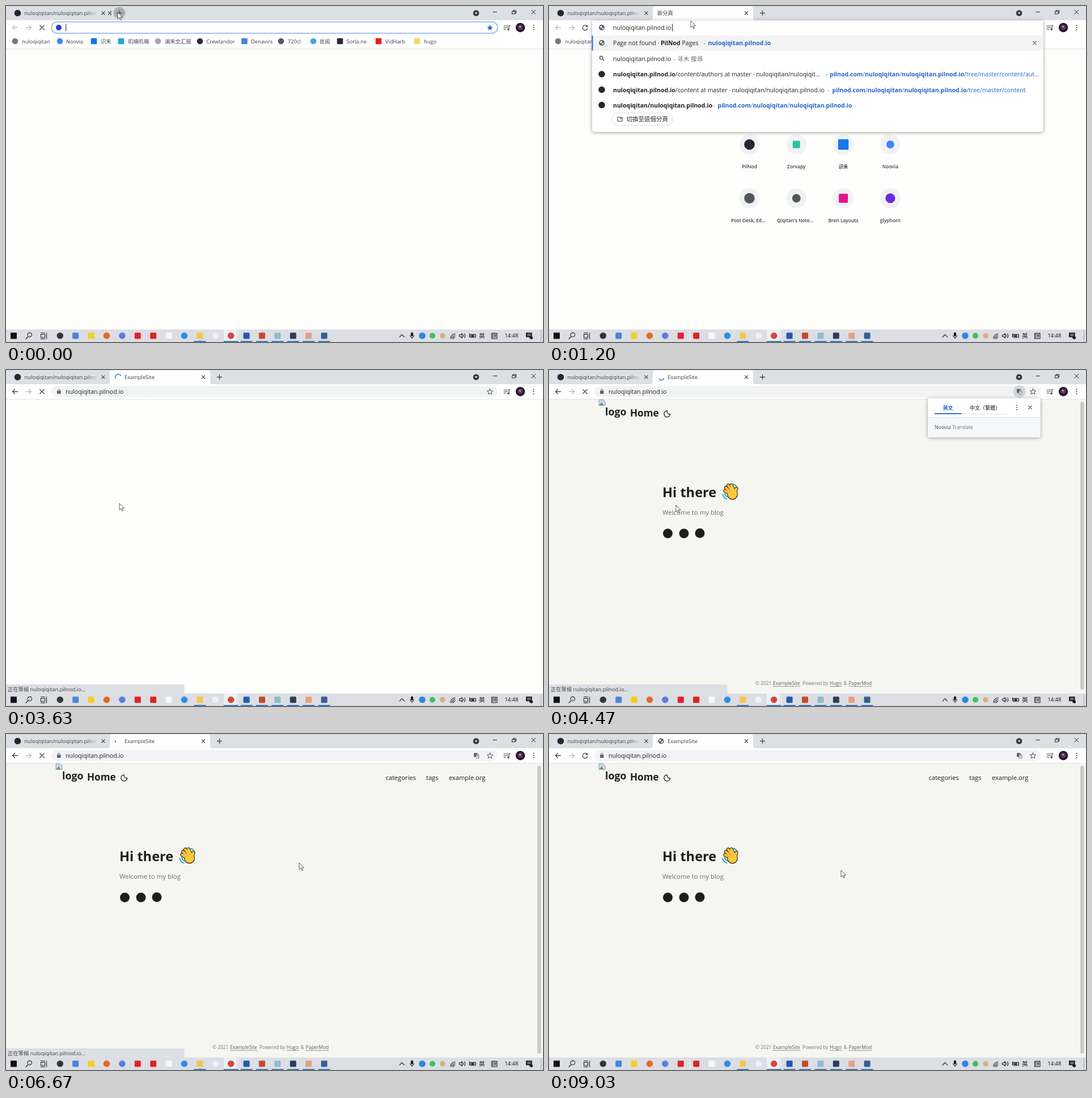
Write an HTML page that moves like this. It is 947 by 592 pixels and loops after 9.56 s.

```html
<!DOCTYPE html>
<html lang="zh-Hant">
<head>
<meta charset="utf-8">
<title>Browser session</title>
<style>
html, body { margin: 0; width: 100%; height: 100%; overflow: hidden; background: #fefefc; }
svg { display: block; width: 100%; height: 100%; }
text { font: 9.3px "Open Sans", "Noto Sans CJK TC", "Noto Sans CJK SC", "Noto Sans CJK", sans-serif; fill: #3c4043; white-space: pre; }
.url text { font-size: 10.6px; fill: #202124; }
.url .link { fill: #2a62c8; }
.url .dim { fill: #6b7075; }
.b { font-weight: 700; font-size: 10.5px; }
.line { fill: none; stroke: #45494d; stroke-width: 1.3; stroke-linecap: round; stroke-linejoin: round; }
.faint { stroke: #b9bcc0; }
.tile { font-size: 8.4px; font-weight: 600; text-anchor: middle; }
.nav text { font-size: 11.1px; fill: #1e1e1e; }
.foot text { font-size: 8.4px; fill: #77777a; }
.foot .a { fill: #5c5c60; }
.float { filter: drop-shadow(0 1.5px 3px rgba(0,0,0,.38)); }

/* One loop is 9560 ms; 1% is 95.6 ms. */
.t { animation: 9560ms step-end infinite; }
.opening { animation-name: opening; }
.opened { animation-name: opened; }
.ntp { animation-name: ntp; }
.stop { animation-name: stop; }
.reload { animation-name: reload; }
.focus { animation-name: focus; }
.drop { animation-name: drop; }
.connect { animation-name: connect; }
.newtitle { animation-name: newtitle; }
.before { animation-name: before; }
.after { animation-name: after; }
.address { animation-name: address; }
.site { animation-name: site; }
.bar { animation-name: bar; }
.popup { animation-name: popup; }
.loading { animation-name: loading; }
.done { animation-name: done; }
.status { animation-name: status; animation-timing-function: linear; }
@keyframes opening { 0% { opacity: 1 } .31%, 100% { opacity: 0 } }
@keyframes opened { 0% { opacity: 0 } .31%, 100% { opacity: 1 } }
@keyframes ntp { 0% { opacity: 0 } 1.57% { opacity: 1 } 32.43%, 100% { opacity: 0 } }
@keyframes stop { 0% { opacity: 1 } 2.09% { opacity: 0 } 14.64% { opacity: 1 } 73.38%, 100% { opacity: 0 } }
@keyframes reload { 0% { opacity: 0 } 2.09% { opacity: 1 } 14.64% { opacity: 0 } 73.38%, 100% { opacity: 1 } }
@keyframes focus { 0% { opacity: 1 } 5.02%, 100% { opacity: 0 } }
@keyframes drop { 0% { opacity: 0 } 5.02% { opacity: 1 } 14.64%, 100% { opacity: 0 } }
@keyframes connect { 0% { opacity: 0 } 14.64% { opacity: 1 } 32.43%, 100% { opacity: 0 } }
@keyframes newtitle { 0% { opacity: 0 } .9% { opacity: 1 } 14.64%, 100% { opacity: 0 } }
@keyframes before { 0% { opacity: 1 } 32.43%, 100% { opacity: 0 } }
@keyframes after { 0% { opacity: 0 } 32.43%, 100% { opacity: 1 } }
@keyframes address { 0% { opacity: 0 } 14.64%, 100% { opacity: 1 } }
@keyframes site { 0% { opacity: 0 } 40.27%, 100% { opacity: 1 } }
@keyframes bar { 0% { opacity: 0 } 41.84%, 100% { opacity: 1 } }
@keyframes popup { 0% { opacity: 0 } 46.03% { opacity: 1 } 64.85%, 100% { opacity: 0 } }
@keyframes loading { 0% { opacity: 0 } 32.43% { opacity: 1 } 73.38%, 100% { opacity: 0 } }
@keyframes done { 0% { opacity: 0 } 73.38%, 100% { opacity: 1 } }
@keyframes status { 0%, 15.6% { opacity: 0 } 15.9%, 75% { opacity: 1 } 76.05%, 100% { opacity: 0 } }

.grow { transform-origin: 183px 0; animation: grow 9560ms infinite; }
.close2 { animation: close2 9560ms infinite; }
.plus { animation: plus 9560ms infinite; }
@keyframes grow { 0%, .31% { transform: scaleX(.02) } 2.1%, 100% { transform: none } }
@keyframes close2 { 0%, .31% { transform: translateX(-165px) } 2.1%, 100% { transform: none } }
@keyframes plus { 0%, .31% { transform: translateX(-176.5px) } 2.1%, 100% { transform: none } }

.spin { fill: none; stroke-width: 1.5; transform-origin: 198px 12.5px; }
.wait { stroke: #8b9096; stroke-dasharray: 110 360; animation: wait 1593.33ms linear infinite; }
.load { stroke: #2f6fd6; animation: load 9560ms linear infinite; }
@keyframes wait { from { transform: rotate(40deg) } to { transform: rotate(-320deg) } }
@keyframes load {
  0%, 32.43% { transform: rotate(10deg); stroke-dasharray: 20 360 }
  37.97% { transform: rotate(145deg); stroke-dasharray: 190 360 }
  44.98% { transform: rotate(340deg); stroke-dasharray: 20 360 }
  49.16% { transform: rotate(430deg); stroke-dasharray: 270 360 }
  54.39% { transform: rotate(460deg); stroke-dasharray: 170 360 }
  58.58% { transform: rotate(670deg); stroke-dasharray: 20 360 }
  63.81% { transform: rotate(740deg); stroke-dasharray: 270 360 }
  69.77% { transform: rotate(870deg); stroke-dasharray: 45 360 }
  73.38%, 100% { transform: rotate(940deg); stroke-dasharray: 150 360 }
}

.mouse { animation: mouse 9560ms ease-in-out infinite; }
@keyframes mouse {
  0%, .31% { transform: translate(197px, 11px) }
  5%, 14.64% { transform: translate(250px, 26px) }
  20%, 23.7% { transform: translate(202px, 240px) }
  37.5%, 44% { transform: translate(200px, 235px) }
  51%, 57% { transform: translate(273px, 244px) }
  66%, 70.8% { transform: translate(517px, 227px) }
  72.5%, 100% { transform: translate(515px, 240px) }
}
.arrow { animation-name: arrow; }
.beam { animation-name: beam; }
@keyframes arrow { 0% { opacity: 1 } 48% { opacity: 0 } 59%, 100% { opacity: 1 } }
@keyframes beam { 0% { opacity: 0 } 48% { opacity: 1 } 59%, 100% { opacity: 0 } }
</style>
</head>
<body>
<svg viewBox="0 0 947 592" preserveAspectRatio="none">
<defs>
  <linearGradient id="fade"><stop offset="0" stop-color="#dcdfe4" stop-opacity="0"/><stop offset="1" stop-color="#dcdfe4"/></linearGradient>
  <g id="globe"><circle r="5" fill="#5f6368"/><path d="M-3.4-2 0-3.2 .8-1-1 .4-2.8 0ZM1 .6 3.6 0 2.6 2.6 .4 3.6Z" fill="#fff"/></g>
  <path id="x" d="M-2.6-2.6 2.6 2.6M2.6-2.6-2.6 2.6"/>
  <path id="star" d="M0-5.2 1.5-1.8 5.1-1.5 2.4 .9 3.2 4.4 0 2.6-3.2 4.4-2.4 .9-5.1-1.5-1.5-1.8Z"/>
  <path id="fingers" d="M321 218 310.5 213M322 216 312 207.5M324 214 316 203.5M327 214 321.5 203M327 219 330.5 209"/>
</defs>

<rect width="947" height="592" fill="#fefefc"/>

<!-- start page -->
<g class="t ntp" id="tiles"></g>

<!-- site -->
<g class="t site">
  <rect y="52" width="947" height="519" fill="#f5f5f2"/>
  <path d="M88 52.5h7.5l3.5 3.5v6.5h-11Z" fill="#c6d9f2" stroke="#8b9096" stroke-width=".8"/>
  <path d="M88.5 62 93 57l3 5Z" fill="#52a552"/>
  <text class="b" x="99" y="80" style="font-size:17.8px;fill:#1e1e1e">logo</text>
  <text class="b" x="143" y="81.5" style="font-size:17.1px;fill:#1e1e1e">Home</text>
  <path class="line" d="M208.5 71.8A4.3 4.3 0 0 0 213.8 77.6 5.5 5.5 0 1 1 208.5 71.8Z" style="stroke:#1e1e1e"/>
  <g class="nav"><text x="669.5" y="80.5">categories</text><text x="741" y="80.5">tags</text><text x="781" y="80.5">example.org</text></g>
  <text class="b" x="200" y="223.5" style="font-size:23.6px;fill:#1e1e1e">Hi there</text>
  <g stroke-linecap="round" fill="none">
    <path d="M306.5 219q1 6 7 8.5M310 217.5q.5 4 4 6M325 201.5q5 1 7 6" stroke="#2aa6b8" stroke-width="1.8"/>
    <use href="#fingers" stroke="#33291a" stroke-width="6.4"/>
    <circle cx="323.5" cy="219" r="9.5" fill="#33291a"/>
    <circle cx="323.5" cy="219" r="8.3" fill="#ffc83d"/>
    <use href="#fingers" stroke="#ffc83d" stroke-width="4.2"/>
    <path d="M313 213.5 318.5 217M315.5 208.5 321 214" stroke="#c98a1e" stroke-width=".8"/>
  </g>
  <text x="200" y="254.5" style="font-size:11.4px;fill:#6c6c6c">Welcome to my blog</text>
  <g fill="#1e1e1e"><circle cx="209.5" cy="288" r="8.5"/><circle cx="238" cy="288" r="8.5"/><circle cx="266" cy="287.5" r="8.5"/></g>
  <g class="foot">
    <text x="364" y="555">© 2021</text><text class="a" x="395" y="555">ExampleSite</text>
    <text x="447" y="555">Powered by</text><text class="a" x="495" y="555">Hugo</text>
    <text x="519.5" y="555">&amp;</text><text class="a" x="528.5" y="555">PaperMod</text>
    <path d="M395 557.5h48M495 557.5h22M528.5 557.5h41" stroke="#77777a" stroke-width=".8"/>
  </g>
</g>
<rect class="t bar" x="937" y="56" width="6.5" height="507" rx="3" fill="#c8c9c9"/>

<!-- status bubble -->
<g class="t status">
  <path d="M0 554h311q3.5 0 3.5 3.5V571H0Z" fill="#dcdfe4"/>
  <text class="t before" x="3" y="565.5">正在建立安全連線...</text>
  <text class="t after" x="3" y="565.5">正在等候 nuloqiqitan.pilnod.io...</text>
</g>

<!-- tab strip -->
<rect width="947" height="25" fill="#dcdfe4"/>
<circle cx="20.5" cy="12.5" r="5.8" fill="#24292f"/>
<text x="32.5" y="16">nuloqiqitan/nuloqiqitan.pilno</text>
<rect x="143" y="2" width="19" height="21" fill="url(#fade)"/>
<rect x="161" y="2" width="6" height="21" fill="#dcdfe4"/>
<use href="#x" class="line" x="171.5" y="12.5"/>
<path class="t opening" d="M184.5 7v11" stroke="#9aa0a6" stroke-width=".8"/>
<g class="t opened">
  <path class="grow" d="M178 25.5Q183 25 183 20V5Q183 .5 187.5 .5H355.5Q360 .5 360 5V20Q360 25 365 25.5Z" fill="#fefefe"/>
</g>
<text class="t newtitle" x="191" y="16">新分頁</text>
<g class="t connect"><circle class="spin wait" cx="198" cy="12.5" r="5" pathLength="360"/><text x="209" y="16">新分頁</text></g>
<text class="t after" x="209" y="16">ExampleSite</text>
<g class="t loading"><circle class="spin load" cx="198" cy="12.5" r="5.2" pathLength="360"/></g>
<g class="t done"><use href="#globe" x="197.5" y="12.5"/></g>
<g class="close2"><use href="#x" class="line" x="348" y="12.5"/></g>
<g class="plus">
  <circle class="t opening" cx="376.5" cy="12" r="10.3" fill="#a9acb1"/>
  <path class="line" d="M372.5 12.5h8M376.5 8.5v8"/>
</g>
<circle cx="829" cy="12.5" r="5.3" fill="#35383c"/><path d="M826.5 11.3h5L829 14.3Z" fill="#fff"/>
<path d="M858.5 10.5h7.5M926.5 7 934 14.5M934 7 926.5 14.5M892.5 9.5h5.5v4.5h-5.5ZM894 9.5V7.8h5.5V12.5H898" fill="none" stroke="#222"/>

<!-- toolbar -->
<rect y="25" width="947" height="27" fill="#fff"/>
<path d="M0 51.5H947" stroke="#dfe1e4"/>
<path class="line faint t before" d="M20.5 38h-9M15.5 34 11.5 38l4 4"/>
<path class="line t after" d="M20.5 38h-9M15.5 34 11.5 38l4 4"/>
<path class="line faint" d="M35.5 38h9M40.5 34l4 4-4 4"/>
<path class="line t stop" d="M59.7 34.2l7.6 7.6M67.3 34.2l-7.6 7.6"/>
<g class="t reload"><path class="line" d="M67.3 35.6A4.4 4.4 0 1 0 68 39.3"/><path d="M68.3 33v4.2H64Z" fill="#45494d"/></g>
<rect x="80" y="28" width="787" height="20" rx="10" fill="#f1f3f4"/>
<g class="t address url"><text x="105" y="41.8">nuloqiqitan.pilnod.io</text></g>
<g class="t connect"><circle class="line" cx="93" cy="38" r="4.7" style="stroke-width:1.1"/><path d="M93 37.5v3M93 35.3v.8" stroke="#45494d" stroke-width="1.2"/></g>
<g class="t after">
  <rect x="90" y="36.5" width="6.5" height="5.5" rx=".8" fill="#5f6368"/><path d="M91.5 37v-1.5a1.7 1.7 0 0 1 3.4 0V37" fill="none" stroke="#5f6368"/>
  <use href="#star" class="line" x="853.5" y="38.3" style="stroke-width:1"/>
</g>
<g class="t focus">
  <rect x="80" y="28" width="787" height="20" rx="10" fill="#fff" stroke="#a4c2f4" stroke-width="2"/>
  <circle cx="93" cy="38" r="5" fill="#2f3bd8"/><path d="M105.7 31.5v13" stroke="#222"/>
</g>
<use class="t before" href="#star" x="853.5" y="38.3" fill="#1f63d6"/>
<circle class="t popup" cx="829.5" cy="38" r="11" fill="#d3d5d8"/>
<g class="t bar">
  <rect x="825" y="33.5" width="6.5" height="7" rx=".8" fill="#5f6368"/><path d="M829 36.5h5v6h-5ZM830.5 38.5h2.5M831.8 37.8v3" fill="#fff" stroke="#5f6368" stroke-width=".8"/>
</g>
<path class="line" d="M878 35h7M878 38h7M878 41h4M887 42v-7.5h2" style="stroke-width:1.2"/><circle cx="885.8" cy="41.3" r="1.6" fill="#45494d"/>
<circle cx="907" cy="38" r="8.2" fill="#221a2c"/><circle cx="907" cy="37.5" r="4.5" fill="#6e3358"/><circle cx="906.5" cy="36.5" r="1.8" fill="#b98aa8"/>
<g fill="#45494d"><circle cx="930.5" cy="34" r="1.1"/><circle cx="930.5" cy="38" r="1.1"/><circle cx="930.5" cy="42" r="1.1"/></g>

<!-- bookmarks -->
<g class="t before"><rect y="50.5" width="947" height="25" fill="#fff"/><path d="M0 75.5H947" stroke="#dfe1e4"/><g id="marks"></g></g>

<!-- suggestions -->
<g class="t drop url">
  <path class="float" d="M76 25.5H871.5V217q0 5-5 5H81q-5 0-5-5Z" fill="#fff"/>
  <rect x="76" y="52" width="795.5" height="26.5" fill="#f2f3f3"/><rect x="75.5" y="52" width="2" height="26.5" fill="#2a6bd8"/>
  <use href="#globe" x="93" y="38"/><use href="#globe" x="93" y="65"/>
  <path class="line" d="M94.5 93.5 97 96M95 91.3a2.8 2.8 0 1 1-5.6 0 2.8 2.8 0 0 1 5.6 0Z"/>
  <g fill="#24292f"><circle cx="93" cy="120" r="5.8"/><circle cx="93" cy="147.5" r="5.8"/><circle cx="93" cy="174.5" r="5.8"/></g>
  <use href="#x" class="line" x="856.5" y="65"/>
  <text x="113" y="41.8">nuloqiqitan.pilnod.io</text><path d="M217.5 31.5v13" stroke="#222"/>
  <text x="113" y="69">Page not found · <tspan class="b">PilNod</tspan> Pages</text><text class="dim" x="272.5" y="69">-</text><text class="link b" x="280.5" y="69">nuloqiqitan.pilnod.io</text>
  <text x="113" y="96.5">nuloqiqitan.pilnod.io</text><text class="dim" x="220" y="96.5">- 寻木 搜尋</text>
  <text x="113" y="124"><tspan class="b">nuloqiqitan.pilnod.io</tspan>/content/authors at master · nuloqiqitan/nuloqiqit...</text><text class="dim" x="487" y="124">-</text>
  <text class="link" x="495" y="124"><tspan class="b">pilnod.com</tspan>/<tspan class="b">nuloqiqitan</tspan>/<tspan class="b">nuloqiqitan.pilnod.io</tspan>/tree/master/content/aut...</text>
  <text x="113" y="151.5"><tspan class="b">nuloqiqitan.pilnod.io</tspan>/content at master · nuloqiqitan/nuloqiqitan.pilnod.io</text><text class="dim" x="491.5" y="151.5">-</text>
  <text class="link" x="499.5" y="151.5"><tspan class="b">pilnod.com</tspan>/<tspan class="b">nuloqiqitan</tspan>/<tspan class="b">nuloqiqitan.pilnod.io</tspan>/tree/master/content</text>
  <text x="113" y="178.5"><tspan class="b">nuloqiqitan/nuloqiqitan.pilnod.io</tspan></text><text class="dim" x="289.5" y="178.5">-</text>
  <text class="link" x="297.5" y="178.5"><tspan class="b">pilnod.com</tspan>/<tspan class="b">nuloqiqitan</tspan>/<tspan class="b">nuloqiqitan.pilnod.io</tspan></text>
  <rect x="110.5" y="188.5" width="107.5" height="22" rx="11" fill="#fff" stroke="#dadce0"/>
  <path class="line" d="M121 196h8v7h-8ZM125.5 196v2.3h3.5" style="stroke-width:1.1"/>
  <text x="136.5" y="203.3" style="font-size:10.5px">切換至這個分頁</text>
</g>

<!-- translate popup -->
<g class="t popup">
  <rect class="float" x="668" y="50" width="198.5" height="68.5" rx="3" fill="#fff"/>
  <path d="M668 84H866.5V115.5q0 3-3 3H671q-3 0-3-3Z" fill="#f6f7f8"/><path d="M668 83.5H866.5M727 77.5h82" stroke="#e1e3e6"/>
  <rect x="680" y="76" width="47.5" height="1.8" fill="#1f63d6"/>
  <text class="b" x="694.5" y="70" style="font-size:9px;fill:#1f63d6">英文</text>
  <text class="b" x="742" y="70" style="font-size:9px;fill:#5f6368">中文（繁體）</text>
  <g fill="#45494d"><circle cx="825" cy="62.3" r="1"/><circle cx="825" cy="66" r="1"/><circle cx="825" cy="69.7" r="1"/></g>
  <use href="#x" class="line" x="848.5" y="66"/>
  <text x="680" y="104.3" style="font-size:8.6px;fill:#6b7075"><tspan font-weight="600">Noovia</tspan> Translate</text>
</g>

<!-- taskbar -->
<rect y="570" width="947" height="22" fill="#dcdee4"/>
<rect x="384" y="570" width="23" height="22" fill="#eef0f3"/><rect x="409" y="570" width="1" height="22" fill="#eef0f3"/>
<rect x="8" y="575.5" width="11" height="11" fill="#111"/>
<g class="line" style="stroke:#222;stroke-width:1.1">
  <path d="M38.5 583 35 586.5M45.5 579.3a3.7 3.7 0 1 1-7.4 0 3.7 3.7 0 0 1 7.4 0Z"/>
  <path d="M61.5 578.5h7v5.5h-7ZM61.5 576h7M61.5 586.5h7M71.5 576v10.5"/>
  <path d="M694 583.3l4.3-4.3 4.3 4.3"/>
  <path d="M784 586a8.5 8.5 0 0 1 8-8.5M786.5 586.3a6 6 0 0 1 5.5-6M789 586.5a3.5 3.5 0 0 1 3-3.5"/>
  <path d="M799.5 579.5h2l3-2.5v8l-3-2.5h-2ZM806.5 579.5q1 1.5 0 3M808.5 577.5q2.5 3.5 0 7"/>
  <path d="M819 578.5h9v5.5h-9ZM828.5 580.5v1.5M817.5 577v6"/><path d="M821 580h4v2.5h-4Z" fill="#222"/>
  <path d="M856.5 576.5h9.5v9.5h-9.5Z"/>
</g>
<rect x="714" y="575" width="4" height="7" rx="2" fill="#111"/><path d="M712.5 580q0 4 3.5 4t3.5-4M716 584v2.5" fill="none" stroke="#111"/>
<circle cx="734" cy="581" r="5.8" fill="#2f86e0"/><circle cx="752" cy="581" r="5" fill="#35c55f"/><circle cx="770" cy="581" r="4.8" fill="#d6b083"/>
<text x="834" y="584.8" style="font-size:10.5px;fill:#111">英</text><text x="857" y="584.3" style="font-size:8.5px;fill:#111">拼</text>
<text x="879.5" y="584.3" style="fill:#111">14:48</text>
<path d="M917 575.5h10.5v8h-2.5l-2 2.5v-2.5h-6Z" fill="#111"/><path d="M919 578.2h6.5M919 580.7h6.5" stroke="#dcdee4"/><circle cx="926.5" cy="584.5" r="2.6" fill="#111"/>
<path d="M943.5 571v21" stroke="#a9adb4"/>
<g id="apps"></g>

<!-- pointer -->
<g class="mouse">
  <path class="t arrow" d="M0 0V11.8L2.8 9.3 4.8 13.7 6.6 12.9 4.7 8.6H8.4Z" fill="#fff" stroke="#333" stroke-width=".8"/>
  <path class="t beam" d="M-2.8-6.5H-1Q0-6.5 0-5.5 0-6.5 1-6.5H2.8M0-5.5V5.5M-2.8 6.5H-1Q0 6.5 0 5.5 0 6.5 1 6.5H2.8" fill="none" stroke="#111" stroke-width="1.1"/>
</g>
</svg>
<script>
const fill = (id, parts) => document.getElementById(id).innerHTML = parts.join("");
const dot = (x, y, r, color) => `<circle cx="${x}" cy="${y}" r="${r}" fill="${color}"/>`;
const box = (x, y, r, color) => `<rect x="${x - r}" y="${y - r}" width="${2 * r}" height="${2 * r}" rx="1.5" fill="${color}"/>`;

const marks = [
  [16, 28, "nuloqiqitan", dot, "#77797c"], [95, 106, "Noovia", dot, "#4285f4"], [155, 167, "识禾", box, "#1772e6"],
  [203, 215, "叽喃叽喃", box, "#22a5dc"], [268, 280, "澜禾文汇居", dot, "#a5a8ab"], [342, 353.5, "Crewlandor", dot, "#2b2d30"],
  [420.5, 432, "Denavirs", box, "#4a82d8"], [485, 497, "720cl", dot, "#55595e"], [542, 553, "批阅", dot, "#45a7d6"],
  [589, 600.5, "Sorla.ne", box, "#2c2830"], [657, 669, "VidHarb", box, "#e8201c"], [725, 737, "hugo", box, "#f6d774"]
];
fill("marks", marks.map(([x, tx, label, shape, color]) =>
  shape(x, 62, 5.3, color) + `<text x="${tx}" y="65.7">${label}</text>`));

const tiles = [
  ["PilNod", dot, 9.3, "#24292f"], ["Zorvapy", box, 6.5, "#2fc2a5"], ["识禾", box, 9.2, "#1677ea"], ["Noovia", dot, 7, "#4285f4"],
  ["Post Desk, Ed...", dot, 9.3, "#55585b"], ["Qiqitan's Note...", dot, 7.5, "#55585b"], ["Bren Layouts", box, 8, "#e0148c"], ["glyphorn", dot, 8.6, "#6a2be0"]
];
fill("tiles", tiles.map(([label, shape, r, color], i) => {
  const x = 353.5 + 82.8 * (i % 4), y = i < 4 ? 244 : 338.7, shift = label.endsWith("...") ? 2 : 0;
  return dot(x, y, 17.8, "#f1f2f4") + shape(x, y, r, color) + `<text class="tile" x="${x - shift}" y="${y + 42}">${label}</text>`;
}));

const apps = [
  [dot, "#33363a"], [box, "#4a86d8"], [box, "#f3cf1d"], [dot, "#e56a1f"], [dot, "#5a7fdc"], [box, "#e3202e"],
  [box, "#d9251d"], [box, "#f4f8f8"], [dot, "#2f8ee0"], [box, "#f4c64c"], [dot, "#eef1fa"], [dot, "#d8453a"],
  [box, "#2459ae"], [box, "#c9472a"], [box, "#8fbccb"], [box, "#2c3c58"], [box, "#e7a27c"], [box, "#35608f"]
];
fill("apps", apps.map(([shape, color], i) => {
  const x = 95.3 + 27.4 * i, open = i === 9 || i > 10, half = i === 11 ? 13 : 10.5;
  return shape(x, 581, shape === dot ? 5.8 : 5.5, color) +
    (open ? `<rect x="${x - half}" y="590.3" width="${2 * half}" height="1.7" fill="#2372bd"/>` : "");
}));
</script>
</body>
</html>
```
